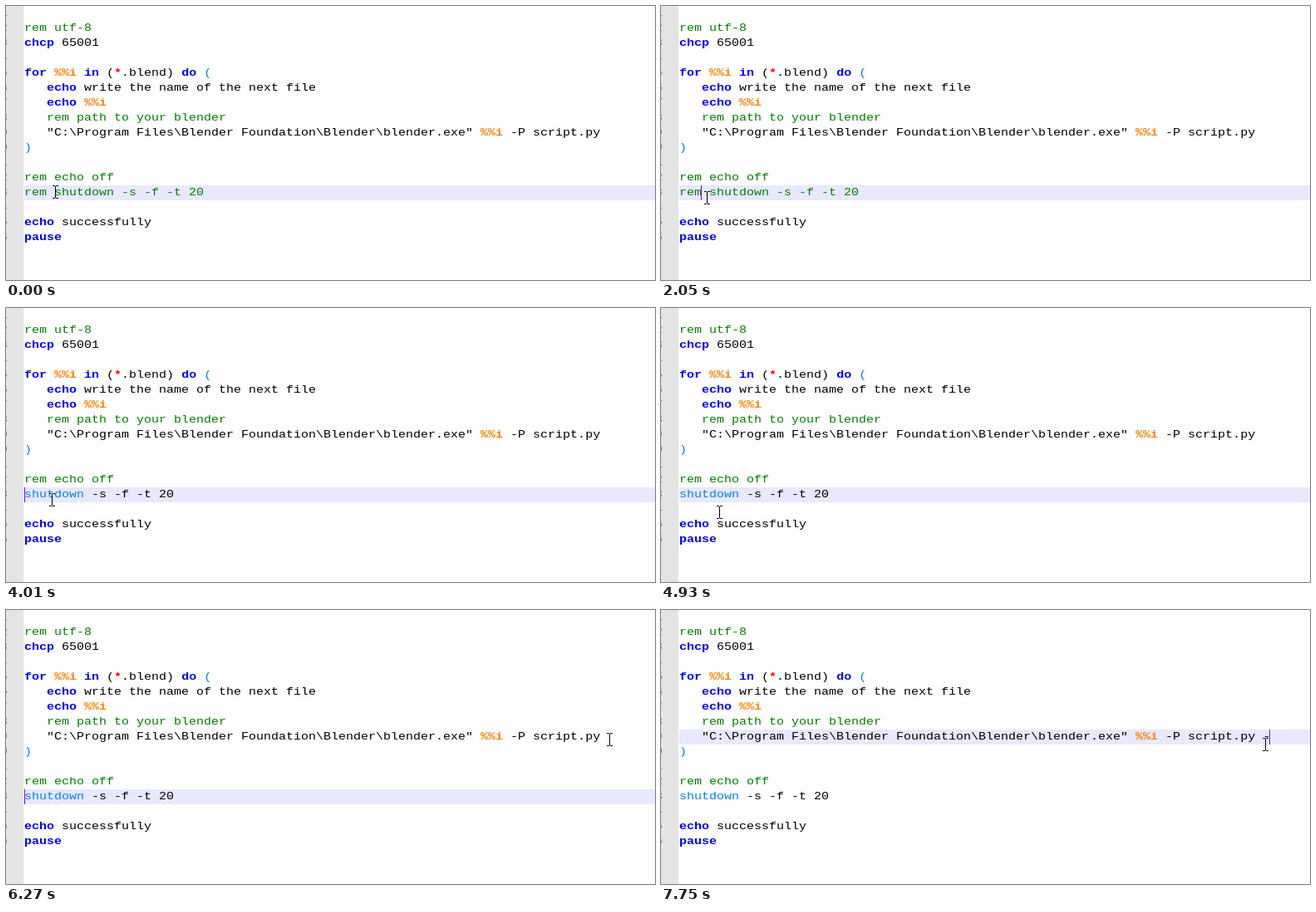
Write an HTML page that moves like this. It is 781 px wide and 330 px high and loops after 8000 ms.

```html
<!DOCTYPE html>
<html lang="en">
<head>
<meta charset="utf-8">
<title>Batch script editor</title>
<style>
  html, body { margin: 0; width: 100%; height: 100%; overflow: hidden; background: #fefefe; }
  #stage { position: relative; width: 781px; height: 330px; overflow: hidden; }
  #stage > * { position: absolute; }

  /* Squat letters, as in Courier: 21px lines scaled to an 18px pitch. */
  pre {
    margin: 0; top: 0; white-space: pre; color: #000;
    font: 15px/21px "Liberation Mono", "Courier New", monospace;
    font-variant-ligatures: none;
    transform: translateY(.143px) scaleY(calc(6 / 7)); transform-origin: 0 0;
  }
  #code { left: 22px; }
  #gutter { left: 0; top: 0; width: 21px; height: 330px; background: #e4e4e4; }
  #numbers { right: 779px; text-align: right; color: #808080; }

  .key { color: #00f; font-weight: bold; }
  .var { color: #ff8000; font-weight: bold; }
  .op { color: #f00; font-weight: bold; }
  .note { color: #008000; }
  .cmd { color: #0080ff; }

  /* One 8 s timeline; percentages are ms / 80. */
  #line, #caret, #mouse, .edit, .prefix, .cmd.name, .dash {
    animation: 8s step-end infinite;
  }

  #line { left: 22px; top: 216px; width: 759px; height: 18px; background: #e8e8ff; animation-name: line; }
  @keyframes line { 0% { top: 216px } 79.5%, 100% { top: 144px } }

  .edit { animation-name: args; }
  .cmd.name { animation-name: name; }
  @keyframes args { 0% { color: #008000 } 41.875%, 100% { color: #000 } }
  @keyframes name { 0% { color: #008000 } 41.875%, 100% { color: #0080ff } }

  .prefix {
    display: inline-block; overflow: hidden; height: 21px; vertical-align: top;
    animation-name: erase;
  }
  @keyframes erase {
    0% { width: 36px }
    41.875% { width: 27px }
    44.125% { width: 18px }
    46.625% { width: 9px }
    50.125%, 100% { width: 0 }
  }

  .dash { animation-name: dash; }
  @keyframes dash { 0% { visibility: hidden } 96.875%, 100% { visibility: visible } }

  #caret {
    left: 0; top: 0; width: 1px; height: 18px; background: #8000ff;
    animation-name: place, blink;
  }
  @keyframes place {
    0% { transform: translate(48px, 216px) }
    37.25% { transform: translate(57px, 216px) }
    41.875% { transform: translate(48px, 216px) }
    44.125% { transform: translate(39px, 216px) }
    46.625% { transform: translate(30px, 216px) }
    50.125% { transform: translate(22px, 216px) }
    79.5% { transform: translate(723px, 144px) }
    96.875%, 100% { transform: translate(732px, 144px) }
  }
  @keyframes blink {
    0%, 18.375%, 33.75%, 57.25%, 71.875%, 87.625% { opacity: 0 }
    11.625%, 25.625%, 37.25%, 63.875%, 78.375%, 94.5%, 100% { opacity: 1 }
  }

  #mouse { left: 0; top: 0; animation-name: mouse; }
  @keyframes mouse {
    0% { transform: translate(56px, 216px) }
    2.25% { transform: translate(53px, 216px) }
    3.375% { transform: translate(50px, 217px) }
    4.5% { transform: translate(49px, 217px) }
    11.625% { transform: translate(50px, 218px) }
    12.75% { transform: translate(51px, 220px) }
    13.875% { transform: translate(52px, 222px) }
    16% { transform: translate(52px, 223px) }
    59.5% { transform: translate(54px, 225px) }
    60.625% { transform: translate(60px, 231px) }
    61.625% { transform: translate(67px, 238px) }
    62.75% { transform: translate(73px, 244px) }
    63.875% { transform: translate(76px, 246px) }
    67.5% { transform: translate(77px, 246px) }
    69.625% { transform: translate(180px, 250px) }
    70.625% { transform: translate(322px, 255px) }
    71.875% { transform: translate(450px, 240px) }
    73% { transform: translate(545px, 215px) }
    74.125% { transform: translate(620px, 190px) }
    75.125% { transform: translate(670px, 170px) }
    76.375% { transform: translate(704px, 156px) }
    77.375% { transform: translate(719px, 150px) }
    78.375% { transform: translate(723px, 148px) }
    79.5% { transform: translate(724px, 147px) }
    82.375%, 100% { transform: translate(724px, 154px) }
  }
</style>
</head>
<body>
<div id="stage">
  <div id="gutter"></div>
  <div id="line"></div>
  <pre id="numbers">1
2
3
4
5
6
7
8
9
10
11
12
13
14
15
16</pre>
  <pre id="code"><span></span>
<span class="note">rem utf-8</span>
<span class="key">chcp</span> 65001

<span class="key">for</span> <span class="var">%%i</span> <span class="key">in</span> (<span class="op">*</span>.blend) <span class="key">do</span> <span class="cmd">(</span>
   <span class="key">echo</span> write the name of the next file
   <span class="key">echo</span> <span class="var">%%i</span>
   <span class="note">rem path to your blender</span>
   "C:\Program Files\Blender Foundation\Blender\blender.exe" <span class="var">%%i</span> -P script.py <span class="dash">-</span>
<span class="cmd">)</span>

<span class="note">rem echo off</span>
<span class="edit"><span class="cmd name"><span class="prefix">rem </span>shutdown</span> -s -f -t 20</span>

<span class="key">echo</span> successfully
<span class="key">pause</span></pre>
  <div id="caret"></div>
  <svg id="mouse" width="7" height="16" shape-rendering="crispEdges">
    <path d="M0 .5h3m1 0h3M3.5 1v14M0 15.5h3m1 0h3" fill="none" stroke="#000"/>
  </svg>
</div>
</body>
</html>
```
